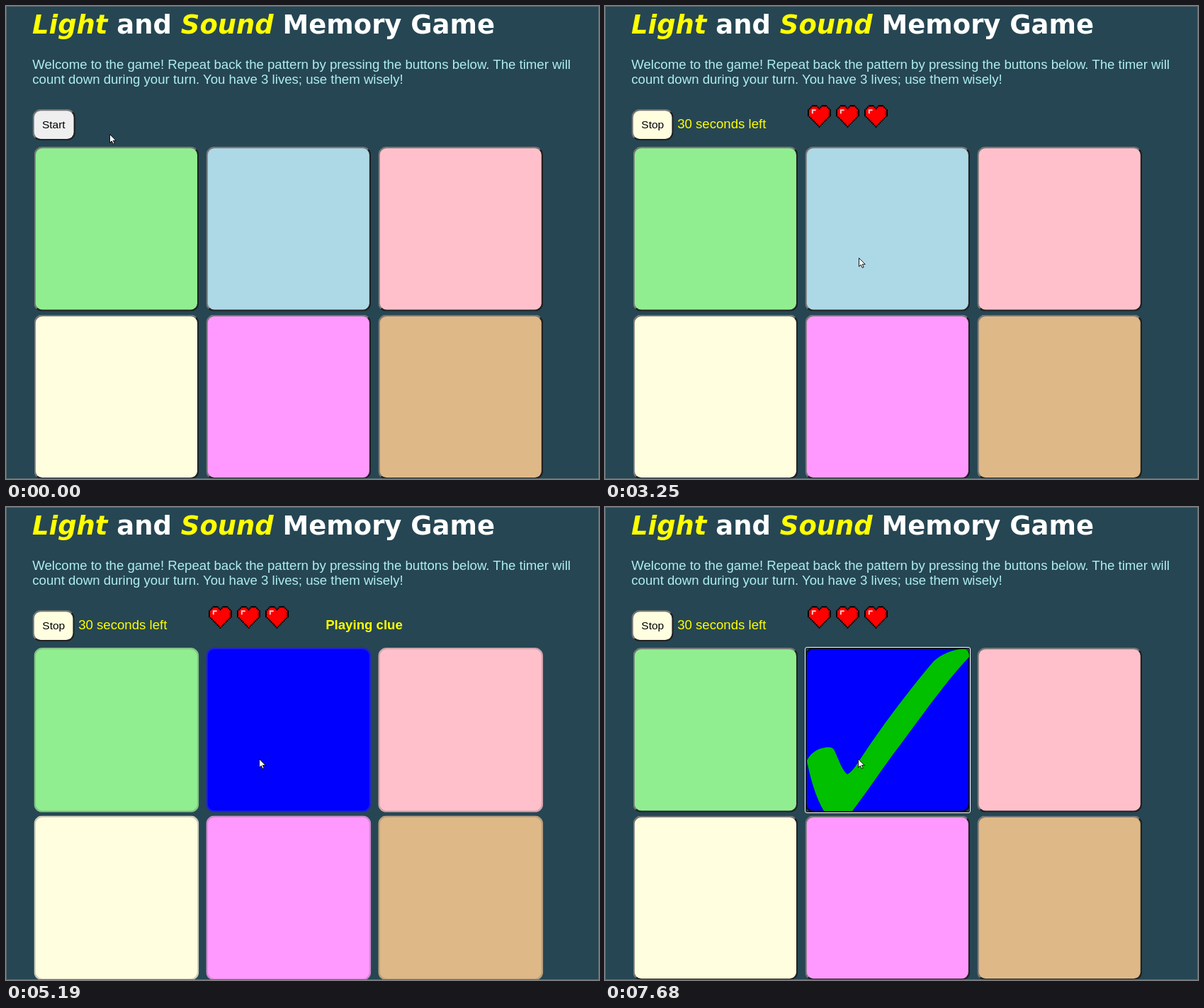
An HTML page for the animation above (8000 ms loop, 837 by 669 pixels).

```html
<!DOCTYPE html>
<html lang="en">
<head>
<meta charset="utf-8">
<title>Light and Sound Memory Game</title>
<style>
  html, body { margin: 0; width: 100%; height: 100%; overflow: hidden; background: #264653; }
  #stage { position: relative; width: 837px; height: 669px; overflow: hidden; }
  #stage > * { position: absolute; }
  svg { left: 0; top: 0; font: 18.62px "Liberation Sans", Arial, sans-serif; white-space: pre; }
  .title { font: bold 36.92px "DejaVu Sans", Verdana, sans-serif; fill: #fff; }
  .title .hot { fill: #ff0; font-style: oblique; }
  .intro { fill: #afeeee; }
  .status { fill: #ff0; }
  .label { font-size: 15.5px; text-anchor: middle; }
  .button { left: 0; top: 0; box-sizing: border-box; transform-origin: 0 0; border: 2px solid;
            border-color: #767676 #212121 #212121 #767676; border-radius: 10px; }
  .tile { width: 200px; height: 200px; }
  .tile.off { border-color: rgba(105, 105, 105, .33); }
  .tile.pressed { border-color: #101010; }
  #toggle { height: 38px; }
  #ring { left: 282px; top: 198px; width: 234px; height: 235px; box-sizing: border-box;
          border: 1px solid #fff; border-radius: 3px; box-shadow: inset 0 0 0 1px #101010; }
  #edge { inset: 0; border: 1px solid #5f6c71; }
</style>
</head>
<body>
<div id="stage">
  <div id="toggle" class="button"></div>
  <div id="ring"></div>
  <svg width="837" height="669">
    <text class="title" x="37" y="39"><tspan class="hot">Light</tspan> and <tspan class="hot">Sound</tspan> Memory Game</text>
    <text class="intro" x="37.3" y="88.5">Welcome to the game! Repeat back the pattern by pressing the buttons below. The timer will</text>
    <text class="intro" x="37.3" y="110">count down during your turn. You have 3 lives; use them wisely!</text>
    <text id="label" class="label" x="67.3" y="173"></text>
    <text id="timer" class="status" x="102.2" y="173.2">30 seconds left</text>
    <text id="clue" class="status" x="451.2" y="173.2" font-weight="bold">Playing clue</text>
    <g id="hearts"></g>
    <path id="tick" fill="#00c000" d="M285 359C289 349 300 341 312 340Q320 339 323 343C328 352 334 372 342 378Q349 375 358 360C390 311 426 263 464 218C476 207 494 200 508 201Q514 202 514 212C477 252 446 297 414 340C391 370 370 403 349 430H309C298 412 290 385 285 359Z"/>
    <path id="cursor" d="M.5.5V12.5L3.2 10 5.2 14.2 7.2 13.3 5.2 9.3H9.2Z" fill="#fff" stroke="#000" stroke-width=".9"/>
  </svg>
  <div id="edge"></div>
</div>
<script>
const LOOP = 8000;
const ZOOM = 1.164;
const byId = id => document.getElementById(id);
const stage = byId("stage");

const place = (el, x, y) => { el.style.transform = `translate(${x}px, ${y}px) scale(${ZOOM})`; };
place(byId("toggle"), 37.4, 146);

const tiles = ["#90ee90", "#add8e6", "#ffc0cb", "#ffffe0", "#ff99ff", "#deb887"].map((color, i) => {
  const el = document.createElement("div");
  place(el, 39.5 + 242.9 * (i % 3), 199 + 237.6 * Math.floor(i / 3));
  stage.insertBefore(el, byId("ring"));
  return { el, color };
});
const BLUE = 1, YELLOW = 3;
const litColor = { [BLUE]: "#00f", [YELLOW]: "#ff0" };

// A stepped heart: two round tops, then two staircases meeting at the point.
const heartTop = "h4v1h1v1h1v-1h1v-1h4v1h1v1h1";
const stairs = n => "h-1v1".repeat(n) + "h-1" + "v-1h-1".repeat(n) + "v-5";
const heart = `
  <path d="M3 0${heartTop}v1h1v5${stairs(8)}h1v-1h1v-1h1z"/>
  <path fill="#f00" d="M3 1${heartTop}v5${stairs(7)}h1v-1h1z"/>
  <path fill="#b80000" d="M15 4h1v4${"h-1v1".repeat(7)}v-1${"h1v-1".repeat(6)}z"/>
  <path fill="#ffd0d0" d="M3 3h3v1h-2v2h-1z"/>`;
byId("hearts").innerHTML = [286, 326, 366].map(x =>
  `<g transform="translate(${x} 140.3) scale(1.94 1.98)">${heart}</g>`).join("");

// Each step changes only the listed parts of the state.
const steps = [
  [0, { started: false, hearts: false, clue: false, off: false, lit: -1, tick: false }],
  [810, { started: true, clue: true, off: true }],
  [940, { hearts: true }],
  [1900, { lit: BLUE }],
  [2870, { lit: -1 }],
  [3120, { clue: false }],
  [3250, { off: false }],
  [3670, { lit: BLUE, tick: true }],
  [4090, { lit: -1, tick: false, off: true, clue: true }],
  [5190, { lit: BLUE }],
  [6010, { lit: -1 }],
  [6290, { lit: YELLOW }],
  [7110, { lit: -1 }],
  [7390, { clue: false }],
  [7530, { off: false }],
  [7680, { lit: BLUE, tick: true }]
];

// Time, x, y: the pointer jumps between sampled positions.
const pointer = [
  [0, 146, 181], [130, 138, 174], [260, 127, 165], [400, 95, 162], [520, 73, 165],
  [1370, 75, 165], [1500, 78, 165], [1650, 105, 177], [1780, 163, 222], [1900, 225, 276],
  [2030, 265, 345], [2150, 294, 399], [2300, 282, 416], [2430, 273, 428], [2720, 266, 428],
  [2870, 288, 416], [3000, 325, 386], [3120, 350, 364], [3250, 358, 356], [4620, 357, 356]
];

const show = (id, on) => { byId(id).style.visibility = on ? "visible" : "hidden"; };

function render(t) {
  const s = Object.assign({}, ...steps.filter(([at]) => at <= t).map(step => step[1]));
  const [, x, y] = pointer.filter(([at]) => at <= t).pop();

  byId("cursor").setAttribute("transform", `translate(${x} ${y})`);
  byId("label").textContent = s.started ? "Stop" : "Start";
  byId("toggle").style.background = s.started ? "#ffffe0" : "#efefef";
  byId("toggle").style.width = s.started ? "51px" : "52px";
  show("timer", s.started);
  show("hearts", s.hearts);
  show("clue", s.clue);
  show("tick", s.tick);
  show("ring", s.tick);
  tiles.forEach(({ el, color }, i) => {
    const pressed = s.tick && i === s.lit;
    el.className = "button tile" + (pressed ? " pressed" : s.off ? " off" : "");
    el.style.backgroundColor = i === s.lit ? litColor[i] : color;
  });
}

const start = performance.now();
function frame() {
  render((performance.now() - start) % LOOP);
  requestAnimationFrame(frame);
}
frame();
</script>
</body>
</html>
```
